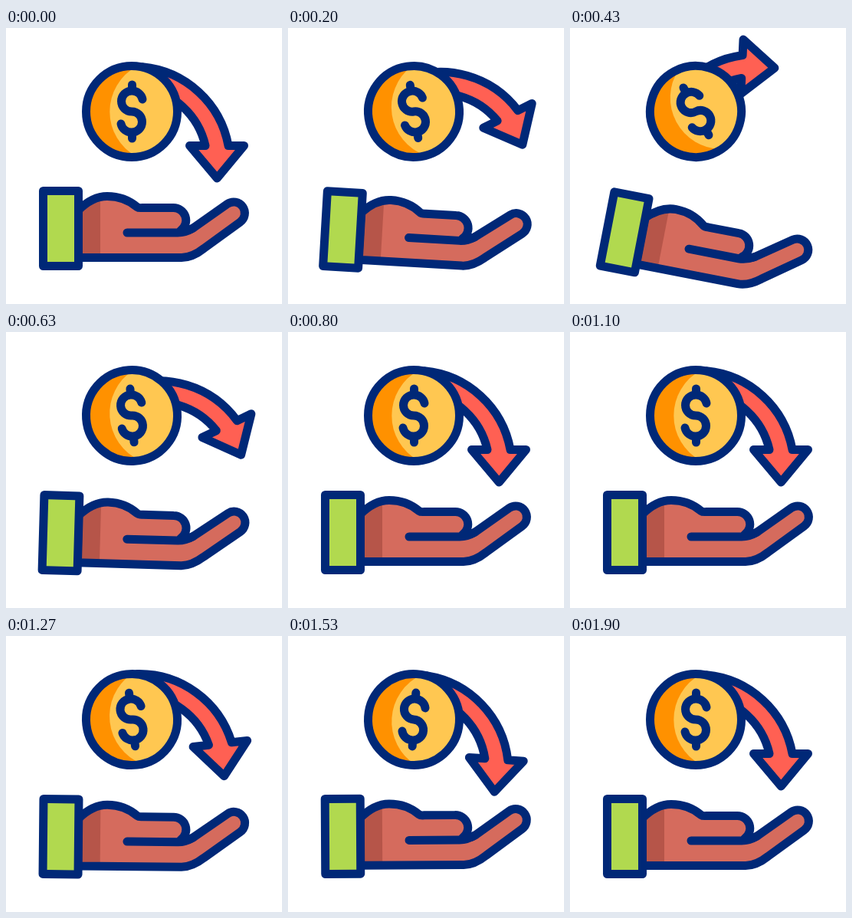
An HTML page that plays this animation: 360 px wide and 360 px high, repeating every 2000 ms.

```html
<!DOCTYPE html>
<html lang="en">
<head>
<meta charset="utf-8">
<title>Coin into hand</title>
<style>
  html, body { margin: 0; width: 100%; height: 100%; overflow: hidden; background: #fff; }
  svg { display: block; width: 100%; height: 100%; }
  .ink { stroke: #002877; stroke-width: 11; stroke-linecap: round; stroke-linejoin: round; }
  .line { fill: none; }
</style>
</head>
<body>
<svg viewBox="0 0 360 360">
  <defs>
    <path id="palm" d="M94 238 C106 226 118 219.5 132 219.5 C149 219.5 161 225 171 233.5 Q173 235 178 234.5
      H218 A16.3 16.3 0 0 1 228 264 Q238 265 244 261 L288.7 229.6 A14.4 14.4 0 0 1 305.3 253.2
      L258.3 287.4 Q243 299.5 229 299.5 H94 Z"/>
    <clipPath id="inPalm"><use href="#palm"/></clipPath>
  </defs>

  <g id="hand">
    <use href="#palm" fill="#d56b5d"/>
    <rect x="94" y="215" width="29" height="90" fill="#b65549" clip-path="url(#inPalm)"/>
    <use href="#palm" class="ink line"/>
    <path class="ink line" d="M158 267 H224 Q234 267 244 261"/>
    <rect class="ink" x="48.5" y="212.5" width="46" height="98" fill="#b1d94f"/>
  </g>

  <path id="arrow" class="ink" fill="#ff6053" d="M178 50.8 A126 126 0 0 1 290 153.5 H310.5
    L275.3 196 L239.5 153.5 H260 A98 98 0 0 0 178 78 Z"/>

  <g id="coin">
    <circle cx="164" cy="109" r="59" fill="#ff9100"/>
    <path fill="#ffc751" d="M170 50.3 A67 67 0 0 0 170 167.7 A59 59 0 0 0 170 50.3 Z"/>
    <circle class="ink line" cx="164" cy="109" r="59.5"/>
    <path class="ink line" d="M178 93 A14 13.5 0 0 0 164 82
      a13.5 13.5 0 0 0 0 27 a13.5 13.5 0 0 1 0 27 A14 13.5 0 0 1 150 125
      M164.5 74 V82 M164.5 136 V144"/>
  </g>
</svg>
<script>
  const LOOP = 2000, FPS = 30, LAST = 57;
  const PEAK = 0.49, HOME = 0.7, END = LAST / FPS;
  const SWINGS = 5;  // per second
  const [hand, arrow, coin] = ['hand', 'arrow', 'coin'].map(id => document.getElementById(id));

  const easeInOut = (u, p) => u < 0.5
    ? 2 ** (p - 1) * u ** p
    : 1 - 2 ** (p - 1) * (1 - u) ** p;

  // 0 at rest, 1 fully pulled back
  function pull(t, release) {
    if (t < PEAK) return easeInOut(t / PEAK, 2.5);
    if (t < HOME) return 1 - release((t - PEAK) / (HOME - PEAK));
    return 0;
  }

  // Overshoot that fades out by the end of the loop
  const wobble = t => t < HOME ? 0
    : Math.sin(2 * Math.PI * SWINGS * (t - HOME)) * Math.max(0, END - t);

  function pose(t) {
    const w = wobble(t);
    const snap = pull(t, u => easeInOut(u, 2.7));
    const shift = pull(t, u => u ** 1.4);
    const turn = -88.5 * pull(t, u => easeInOut(u, 1.2)) + 12 * w;
    const roll = -28.5 * snap + 12 * w;
    const tilt = 11.1 * snap - w;
    arrow.setAttribute('transform', `translate(${11 * shift} ${51 * shift}) rotate(${turn} 164 109)`);
    coin.setAttribute('transform', `rotate(${roll} 164 109)`);
    hand.setAttribute('transform', `rotate(${tilt} 46 262)`);
  }

  const start = performance.now();
  function tick() {
    const ms = (performance.now() - start) % LOOP;
    const step = Math.min(LAST, Math.floor((ms + 4) * FPS / 1000));
    pose(step / FPS);
    requestAnimationFrame(tick);
  }
  tick();
</script>
</body>
</html>
```
